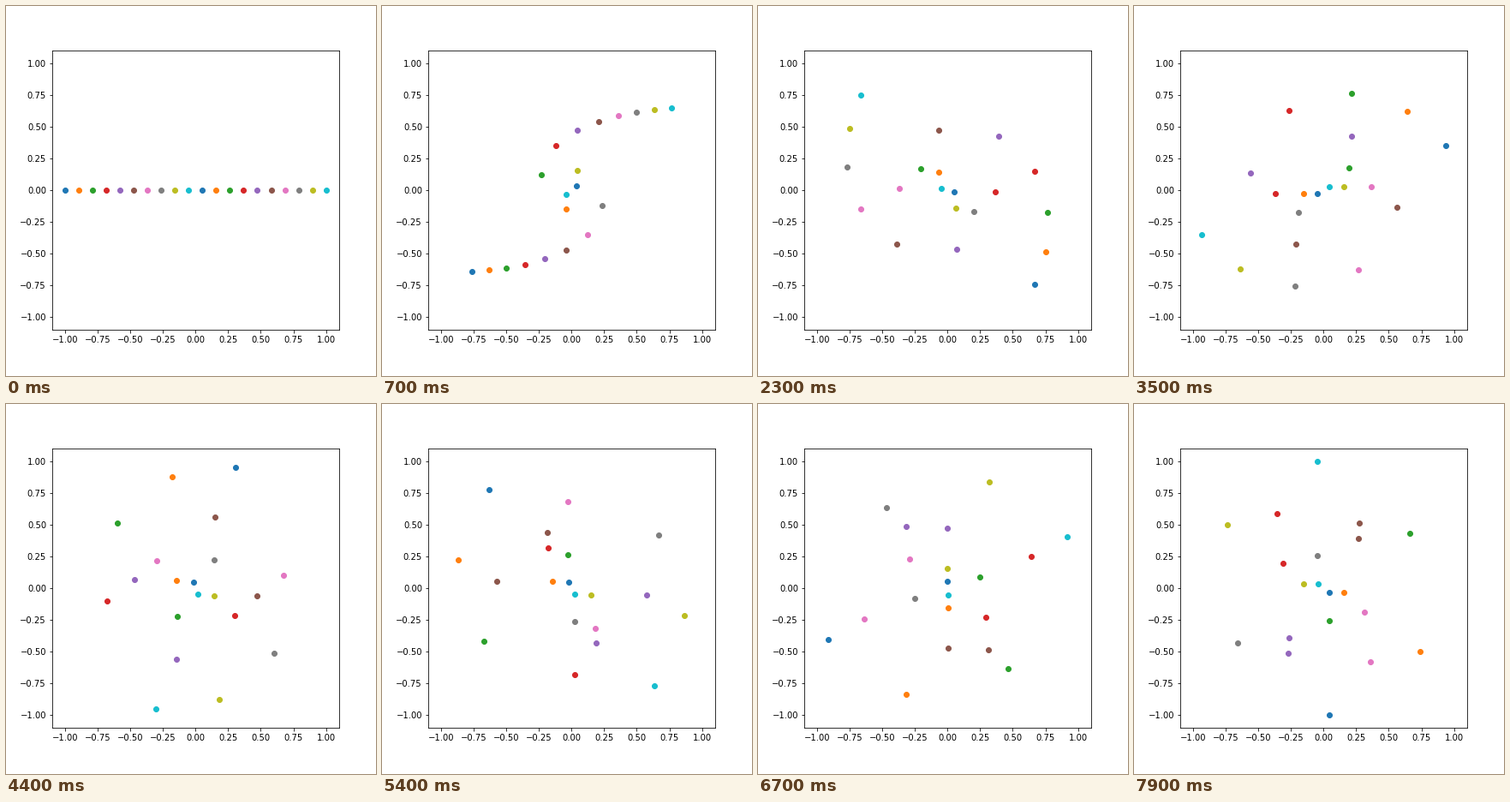
A matplotlib script that plays this animation: 432 px wide and 432 px high, repeating every 8 s.

```python
import matplotlib.pyplot as plt
import numpy as np
from matplotlib.animation import FuncAnimation

FRAMES = 80
INTERVAL = 100  # ms
SPEED = 1.0     # every dot has the same linear speed

start = np.linspace(-1, 1, 20)
ang_vel = SPEED / np.abs(start)

fig = plt.figure(figsize=(6, 6), dpi=72, facecolor="white")
fig.subplots_adjust(left=0.125, right=0.9, bottom=0.125, top=0.88)
ax = fig.add_subplot()
ax.set(xlim=(-1.1, 1.1), ylim=(-1.1, 1.1))
ticks = np.linspace(-1, 1, 9)
ax.set_xticks(ticks)
ax.set_yticks(ticks)

dots = [ax.plot([x], [0], "o", color=f"C{i % 10}")[0]
        for i, x in enumerate(start)]


def update(frame):
    angle = ang_vel * frame * INTERVAL / 1000
    xs, ys = start * np.cos(angle), start * np.sin(angle)
    for dot, x, y in zip(dots, xs, ys):
        dot.set_data([x], [y])
    return dots


anim = FuncAnimation(fig, update, frames=FRAMES, interval=INTERVAL,
                     repeat=True, repeat_delay=0, blit=False)
plt.show()
```
